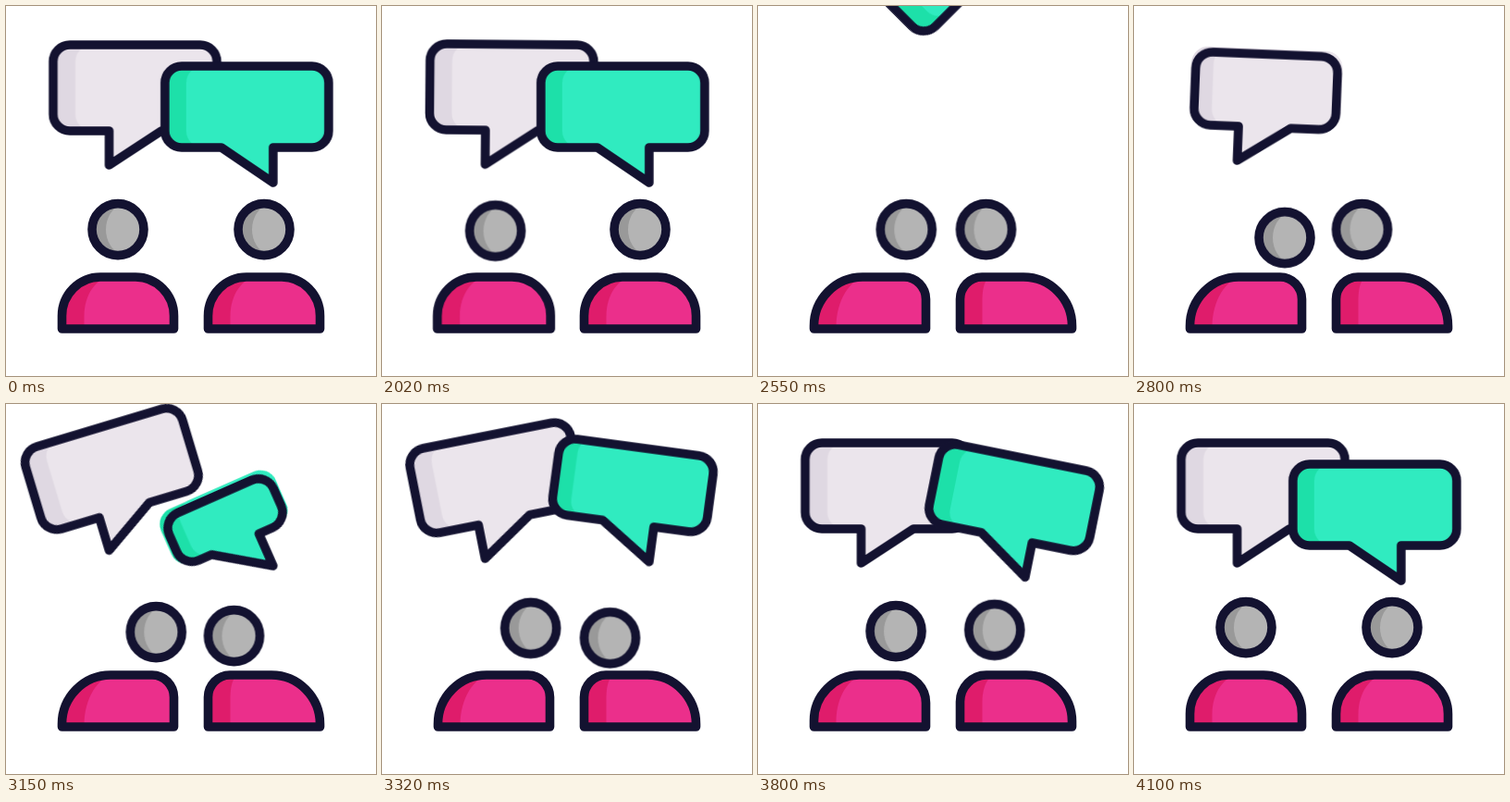
Animation of 400x400 px, one loop 4120 ms. Source, as an HTML page without scripts:

```html
<!DOCTYPE html>
<html lang="en">
<head>
<meta charset="utf-8">
<title>Conversation</title>
<style>
html, body { margin: 0; width: 100%; height: 100%; overflow: hidden; background: #fff; }
svg { display: block; width: 100%; height: 100%; }
.ink { fill: none; stroke: #131230; stroke-width: 9.6; stroke-linejoin: round; stroke-linecap: round; }
.pale { fill: #ebe5ec; } .pale-dim { fill: #dfd8e2; }
.mint { fill: #30ebc0; } .mint-dim { fill: #1de0a9; }
.pink { fill: #eb2f8b; } .pink-dim { fill: #df1c6b; }
.gray { fill: #b4b4b4; } .gray-dim { fill: #999; }

.a { animation: 4120ms cubic-bezier(.33, 0, .67, 1) infinite; }
/* fills grow slightly ahead of their outline */
.lead { animation-delay: -40ms; }

/* first bubble: fly off, pop back in, swing to rest */
.w-lift { animation-name: w-lift; }
@keyframes w-lift {
  0%, 48.54% { transform: translateY(0) scale(1); animation-timing-function: cubic-bezier(.333, 0, .667, .333); }
  58.25% { transform: translateY(-276px) scale(1); animation-timing-function: step-end; }
  63.11% { transform: translateY(-4px) scale(0); animation-timing-function: ease-out; }
  65.53% { transform: translateY(-4px) scale(1); }
  67.96% { transform: translateY(-5px) scale(1); }
  73.54% { transform: translateY(-15px) scale(1); }
  75.24% { transform: translateY(-14.6px) scale(1); }
  84%, 100% { transform: translateY(0) scale(1); }
}
.w-turn { animation-name: w-turn; }
@keyframes w-turn {
  0%, 48.54% { transform: rotate(0deg); }
  57.04%, 63.11% { transform: rotate(45deg); animation-timing-function: linear; }
  65.53% { transform: rotate(24deg); animation-timing-function: linear; }
  67.96% { transform: rotate(2.5deg); animation-timing-function: cubic-bezier(.2, .64, .5, 1); }
  75.48% { transform: rotate(-17deg); }
  88.59%, 100% { transform: rotate(0deg); }
}
.w-shape { animation-name: w-shape; }
@keyframes w-shape {
  0%, 61.5% { d: path("M0 0v-37h-42.5a18 18 0 0 1-18-18v-57a18 18 0 0 1 18-18h141a18 18 0 0 1 18 18v57a18 18 0 0 1-18 18h-42z"); animation-timing-function: step-end; }
  63.11% { d: path("M0 0v-37h-2.5a8 8 0 0 1-8-8v-17a8 8 0 0 1 8-8h61a8 8 0 0 1 8 8v17a8 8 0 0 1-8 8h-2z"); animation-timing-function: linear; }
  65.53% { d: path("M0 0v-37h-15.5a18 18 0 0 1-18-18v-25a18 18 0 0 1 18-18h87a18 18 0 0 1 18 18v25a18 18 0 0 1-18 18h-15z"); animation-timing-function: cubic-bezier(.3, .45, .6, 1); }
  72%, 100% { d: path("M0 0v-37h-42.5a18 18 0 0 1-18-18v-57a18 18 0 0 1 18-18h141a18 18 0 0 1 18 18v57a18 18 0 0 1-18 18h-42z"); }
}
.w-face { animation-name: w-face; }
@keyframes w-face {
  0%, 61.5% { x: -36.5px; y: -130px; width: 153px; height: 93px; animation-timing-function: step-end; }
  63.11% { x: 13.5px; y: -70px; width: 53px; height: 33px; animation-timing-function: linear; }
  65.53% { x: -9.5px; y: -98px; width: 99px; height: 61px; animation-timing-function: cubic-bezier(.3, .45, .6, 1); }
  72%, 100% { x: -36.5px; y: -130px; width: 153px; height: 93px; }
}

/* second bubble */
.g-lift { animation-name: g-lift; }
@keyframes g-lift {
  0%, 53.4% { transform: translateY(0) scale(1); animation-timing-function: cubic-bezier(.333, 0, .667, .333); }
  63.11% { transform: translateY(-276px) scale(1); animation-timing-function: step-end; }
  74.03% { transform: translateY(-16px) scale(0); animation-timing-function: ease-out; }
  76.46% { transform: translateY(-16px) scale(1); }
  78.88% { transform: translateY(-18px) scale(1); }
  85.2% { transform: translateY(-31px) scale(1); animation-timing-function: linear; }
  86.17% { transform: translateY(-29.5px) scale(1); animation-timing-function: linear; }
  87.86% { transform: translateY(-21.7px) scale(1); animation-timing-function: ease-out; }
  94.66%, 100% { transform: translateY(0) scale(1); }
}
.g-turn { animation-name: g-turn; }
@keyframes g-turn {
  0%, 53.4% { transform: rotate(0deg); }
  61.89%, 74.03% { transform: rotate(-45deg); animation-timing-function: linear; }
  76.46% { transform: rotate(-24deg); animation-timing-function: linear; }
  78.88% { transform: rotate(-2.5deg); animation-timing-function: cubic-bezier(.2, .64, .5, 1); }
  87.38% { transform: rotate(18.4deg); }
  99.03%, 100% { transform: rotate(0deg); }
}
.g-shape { animation-name: g-shape; }
@keyframes g-shape {
  0%, 72% { d: path("M0 0v-38h42a18 18 0 0 0 18-18v-52a18 18 0 0 0-18-18h-141a18 18 0 0 0-18 18v52a18 18 0 0 0 18 18h43z"); animation-timing-function: step-end; }
  74.03% { d: path("M0 0v-38h2a8 8 0 0 0 8-8v-12a8 8 0 0 0-8-8h-61a8 8 0 0 0-8 8v12a8 8 0 0 0 8 8h3z"); animation-timing-function: linear; }
  76.46% { d: path("M0 0v-38h16a18 18 0 0 0 18-18v-20a18 18 0 0 0-18-18h-87a18 18 0 0 0-18 18v20a18 18 0 0 0 18 18h15z"); animation-timing-function: cubic-bezier(.3, .45, .6, 1); }
  83%, 100% { d: path("M0 0v-38h42a18 18 0 0 0 18-18v-52a18 18 0 0 0-18-18h-141a18 18 0 0 0-18 18v52a18 18 0 0 0 18 18h43z"); }
}
.g-face { animation-name: g-face; }
@keyframes g-face {
  0%, 72% { x: -94px; y: -126px; width: 154px; height: 88px; animation-timing-function: step-end; }
  74.03% { x: -43px; y: -66px; width: 53px; height: 28px; animation-timing-function: linear; }
  76.46% { x: -66px; y: -94px; width: 100px; height: 56px; animation-timing-function: cubic-bezier(.3, .45, .6, 1); }
  83%, 100% { x: -94px; y: -126px; width: 154px; height: 88px; }
}

/* heads: slide across, nod while speaking, slide back */
.l-slide { animation-name: l-slide; }
@keyframes l-slide {
  0%, 48.54% { transform: translateX(0); animation-timing-function: cubic-bezier(.3, .15, .6, 1); }
  56.8% { transform: translateX(39.3px); }
  62% { transform: translateX(39.3px); }
  67% { transform: translateX(42px); }
  75% { transform: translateX(41.5px); }
  82.5%, 88.59% { transform: translateX(39.3px); }
  99.03%, 100% { transform: translateX(0); }
}
.l-nod { animation-name: l-nod; }
@keyframes l-nod {
  0%, 48.54% { transform: translateY(0); animation-timing-function: ease-out; }
  52.43% { transform: translateY(7px); }
  56.8%, 61.9% { transform: translateY(0); }
  66% { transform: translateY(9px); }
  71.6% { transform: translateY(8.5px); }
  76.46% { transform: translateY(5px); animation-timing-function: ease-out; }
  82.5%, 88.59% { transform: translateY(0); }
  93.8% { transform: translateY(5px); }
  99.03%, 100% { transform: translateY(0); }
}
.r-slide { animation-name: r-slide; }
@keyframes r-slide {
  0%, 49.5% { transform: translateX(0); animation-timing-function: cubic-bezier(.3, .15, .6, 1); }
  57.04%, 88.59% { transform: translateX(-32.5px); }
  99.03%, 100% { transform: translateX(0); }
}
.r-nod { animation-name: r-nod; }
@keyframes r-nod {
  0%, 49.5% { transform: translateY(0); animation-timing-function: ease-out; }
  53% { transform: translateY(6px); }
  57.04% { transform: translateY(-1px); }
  60%, 72.8% { transform: translateY(0); }
  76.46% { transform: translateY(9px); }
  82.5% { transform: translateY(12px); }
  86.17% { transform: translateY(11.5px); }
  95%, 100% { transform: translateY(0); }
}

/* shoulders lean toward each other */
.l-swell { animation-name: l-swell; }
@keyframes l-swell {
  0%, 48.54% { transform: scaleX(1); animation-timing-function: ease-out; }
  49.6% { transform: scaleX(1.018); }
  56.8%, 100% { transform: scaleX(1); }
}
.l-lean { animation-name: lean; }
.r-lean { animation-name: lean; animation-delay: 20ms; }
@keyframes lean {
  0%, 48.54% { d: path("M-60.5 349V335C-60.5 312-42 293-19 293H19C42 293 60.5 312 60.5 335V349Z"); }
  56.5%, 88.3% { d: path("M-60.5 349V346C-60.5 317-37 293-8 293H37C50 293 60.5 304 60.5 317V349Z"); }
  98.5%, 100% { d: path("M-60.5 349V335C-60.5 312-42 293-19 293H19C42 293 60.5 312 60.5 335V349Z"); }
}
.l-chest { animation-name: l-chest; }
@keyframes l-chest {
  0%, 48.54% { d: path("M-36.5 349V335C-36.5 312-23 293-7 293H19C42 293 60.5 312 60.5 335V349Z"); }
  56.5%, 88.3% { d: path("M-36.5 349V346C-36.5 320-22 293-2 293H37C50 293 60.5 304 60.5 317V349Z"); }
  98.5%, 100% { d: path("M-36.5 349V335C-36.5 312-23 293-7 293H19C42 293 60.5 312 60.5 335V349Z"); }
}
.r-chest { animation-name: r-chest; animation-delay: 20ms; }
@keyframes r-chest {
  0%, 48.54% { d: path("M-36.5 349V335C-36.5 312-23 293-7 293H19C42 293 60.5 312 60.5 335V349Z"); }
  56.5%, 88.3% { d: path("M-36.5 349V317C-36.5 304-33 293-27 293H8C37 293 60.5 317 60.5 346V349Z"); }
  98.5%, 100% { d: path("M-36.5 349V335C-36.5 312-23 293-7 293H19C42 293 60.5 312 60.5 335V349Z"); }
}
</style>
</head>
<body>
<svg viewBox="0 0 400 400">
  <defs>
    <g id="head">
      <circle class="gray-dim" r="28"/>
      <path class="gray" d="M4-27.7C-7-23-13-12-13 0S-7 23 4 27.7A28 28 0 0 0 4-27.7Z"/>
      <circle class="ink" r="28"/>
    </g>
  </defs>

  <g transform="translate(121 0)">
    <g class="a l-swell">
      <path class="a l-lean pink-dim" d="M-60.5 349V335C-60.5 312-42 293-19 293H19C42 293 60.5 312 60.5 335V349Z"/>
      <path class="a l-chest pink" d="M-36.5 349V335C-36.5 312-23 293-7 293H19C42 293 60.5 312 60.5 335V349Z"/>
      <path class="a l-lean ink" d="M-60.5 349V335C-60.5 312-42 293-19 293H19C42 293 60.5 312 60.5 335V349Z"/>
    </g>
    <g class="a l-slide"><g class="a l-nod"><use href="#head" y="241.6"/></g></g>
  </g>

  <g transform="translate(279 0)">
    <g transform="scale(-1 1)">
      <path class="a r-lean pink-dim" d="M-60.5 349V335C-60.5 312-42 293-19 293H19C42 293 60.5 312 60.5 335V349Z"/>
    </g>
    <path class="a r-chest pink" d="M-36.5 349V335C-36.5 312-23 293-7 293H19C42 293 60.5 312 60.5 335V349Z"/>
    <g transform="scale(-1 1)">
      <path class="a r-lean ink" d="M-60.5 349V335C-60.5 312-42 293-19 293H19C42 293 60.5 312 60.5 335V349Z"/>
    </g>
    <g class="a r-slide"><g class="a r-nod"><use href="#head" y="241.6"/></g></g>
  </g>

  <g transform="translate(111.5 172)">
    <g class="a w-lift"><g class="a w-turn">
      <path class="a w-shape lead pale-dim"/>
      <rect class="a w-face lead pale" rx="18"/>
      <path class="pale" d="M0 0V-50H56.5V-37Z"/>
      <path class="a w-shape ink"/>
    </g></g>
  </g>

  <g transform="translate(288.8 191)">
    <g class="a g-lift"><g class="a g-turn">
      <path class="a g-shape lead mint-dim"/>
      <rect class="a g-face lead mint" rx="18"/>
      <path class="mint" d="M0 0V-50H-56V-38Z"/>
      <path class="a g-shape ink"/>
    </g></g>
  </g>
</svg>
</body>
</html>
```
